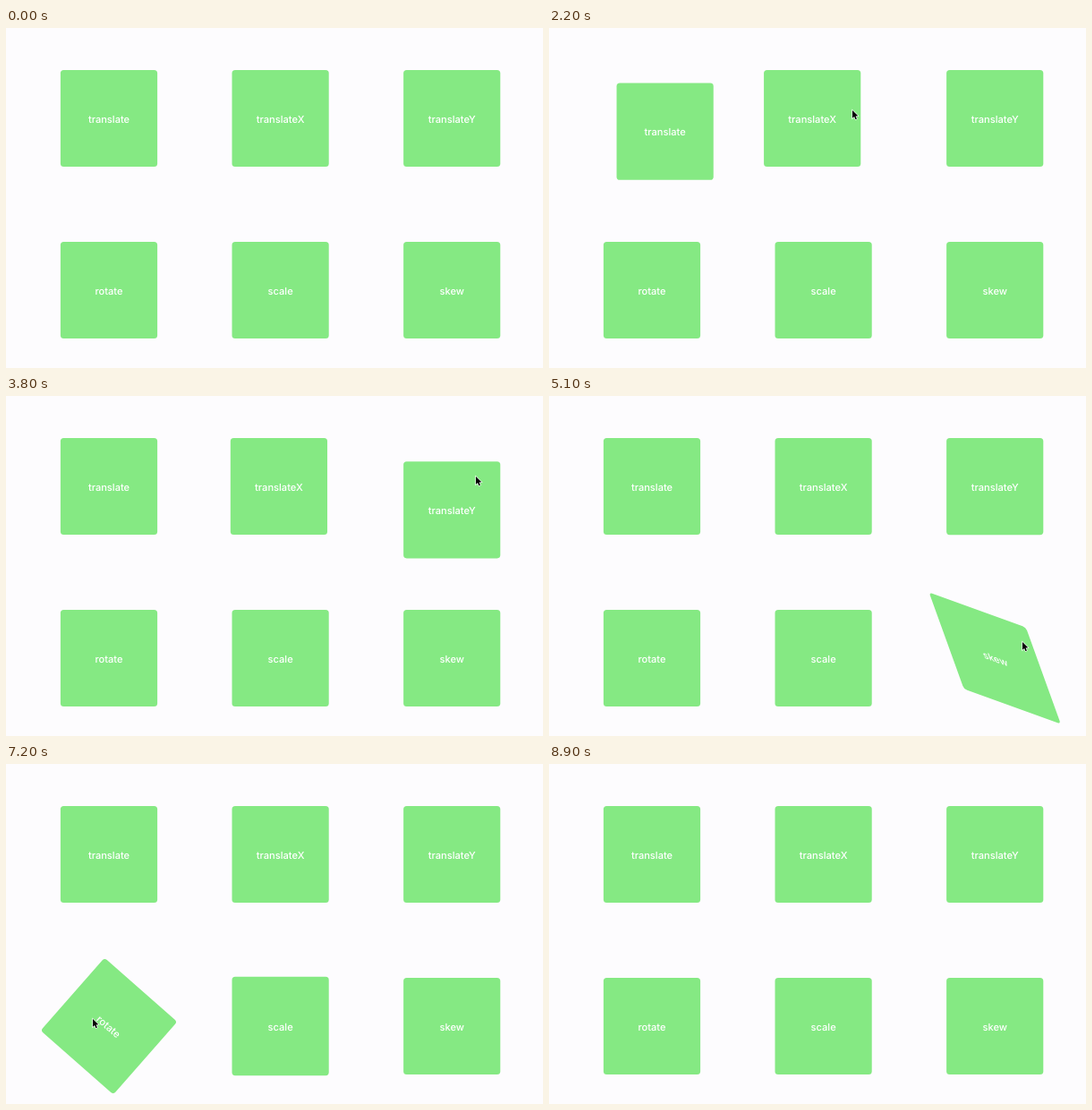
An HTML page with a canvas for the animation above (9000 ms loop, 600 by 380 pixels).

```html
<!DOCTYPE html>
<html lang="en">
<head>
<meta charset="utf-8">
<title>CSS transforms on hover</title>
<style>
  html, body { margin: 0; width: 100%; height: 100%; overflow: hidden; background: #fdfcfe; }
  canvas { display: block; width: 600px; height: 380px; }
</style>
</head>
<body>
<canvas id="stage" width="600" height="380"></canvas>
<script>
const ctx = document.getElementById('stage').getContext('2d');
const LOOP = 9000, STEP = 100, DURATION = 1000;
const FIRST_HOVER = 640, GAP = 35, TRAVEL = 240;
const SIZE = 108.2, RADIUS = 3.6, SHIFT = 28.8, PITCH = 191.6;
const rad = deg => deg * Math.PI / 180;

// In hover order: grid cell, time the pointer leaves, where it rests, and the effect.
const boxes = [
  { label: 'translate', col: 0, row: 0, leave: 1705, rest: [150, 90],
    apply: k => ctx.translate(SHIFT * k, SHIFT * k) },
  { label: 'translateX', col: 1, row: 0, leave: 2970, rest: [339, 92],
    apply: k => ctx.translate(-SHIFT * k, 0) },
  { label: 'translateY', col: 2, row: 0, leave: 4125, rest: [525, 90],
    apply: k => ctx.translate(0, SHIFT * k) },
  { label: 'skew', col: 2, row: 1, leave: 5210, rest: [529, 275],
    apply: k => {
      const s = Math.tan(rad(20) * k);
      ctx.transform(1, s, s, 1, 0, 0);
    } },
  { label: 'scale', col: 1, row: 1, leave: 6365, rest: [311, 295],
    apply: k => ctx.scale(1, 1 + 0.4 * k) },
  { label: 'rotate', col: 0, row: 1, leave: 7540, rest: [97, 285],
    apply: k => ctx.rotate(rad(45) * k) }
];

boxes.forEach((box, i) => {
  box.x = 115 + PITCH * box.col;
  box.y = 101 + 192 * box.row;
  box.enter = i ? boxes[i - 1].leave + GAP : FIRST_HOVER;
});

const clamp = v => Math.min(1, Math.max(0, v));

// cubic-bezier(0.42, 0, 0.58, 1)
function easeInOut(p) {
  let lo = 0, hi = 1;
  for (let i = 0; i < 24; i++) {
    const u = (lo + hi) / 2, v = 1 - u;
    const x = 3 * v * v * u * 0.42 + 3 * v * u * u * 0.58 + u * u * u;
    if (x < p) lo = u; else hi = u;
  }
  return lo * lo * (3 - 2 * lo);
}

const progress = (t, start, length = DURATION) => easeInOut(clamp((t - start) / length));

function drawBox(box, t) {
  ctx.save();
  ctx.translate(box.x, box.y);
  box.apply(progress(t, box.enter) - progress(t, box.leave));
  ctx.fillStyle = '#85e983';
  ctx.beginPath();
  ctx.roundRect(-SIZE / 2, -SIZE / 2, SIZE, SIZE, RADIUS);
  ctx.fill();
  ctx.fillStyle = '#fff';
  ctx.fillText(box.label, 0, 4.7);
  ctx.restore();
}

// The pointer glides from one resting point to the next around each handover.
function pointerAt(t) {
  let [x, y] = boxes[0].rest;
  for (const { rest, enter } of boxes.slice(1)) {
    const k = progress(t, enter - TRAVEL / 2, TRAVEL);
    x += (rest[0] - x) * k;
    y += (rest[1] - y) * k;
  }
  return [x, y];
}

function trace(points) {
  ctx.beginPath();
  points.forEach(([x, y]) => ctx.lineTo(x, y));
}

function drawArrow() {
  ctx.scale(0.85, 0.85);
  trace([[0, 0], [0, 10.4], [2.4, 8.2], [4.1, 12], [5.8, 11.2], [4.2, 7.6], [7.4, 7.4]]);
  ctx.closePath();
  ctx.lineWidth = 1.4;
  ctx.strokeStyle = '#fff';
  ctx.stroke();
  ctx.fillStyle = '#000';
  ctx.fill();
}

function drawBeam() {
  for (const [color, width] of [['#fff', 2.2], ['#222', 1]]) {
    ctx.strokeStyle = color;
    ctx.lineWidth = width;
    for (const side of [-1, 1]) {
      trace([[2.5 * side, -5.5], [side, -5.5], [0, -4.5], [0, 4.5], [side, 5.5], [2.5 * side, 5.5]]);
      ctx.stroke();
    }
  }
}

function drawPointer(t) {
  if (t < FIRST_HOVER || t > boxes[boxes.length - 1].leave) return;
  const [x, y] = pointerAt(t);
  const overText = boxes.some(b =>
    Math.abs(x - b.x) < ctx.measureText(b.label).width / 2 && Math.abs(y - b.y) < 7);
  ctx.save();
  ctx.translate(x, y);
  if (overText) drawBeam(); else drawArrow();
  ctx.restore();
}

function draw(now) {
  const t = Math.floor((now % LOOP) / STEP) * STEP;
  ctx.fillStyle = '#fdfcfe';
  ctx.fillRect(0, 0, 600, 380);
  ctx.font = '500 11.1px Inter, Roboto, sans-serif';
  ctx.textRendering = 'geometricPrecision';
  ctx.textAlign = 'center';
  boxes.forEach(box => drawBox(box, t));
  drawPointer(t);
}

const start = performance.now();
function tick() {
  draw(performance.now() - start);
  requestAnimationFrame(tick);
}
tick();
</script>
</body>
</html>
```
